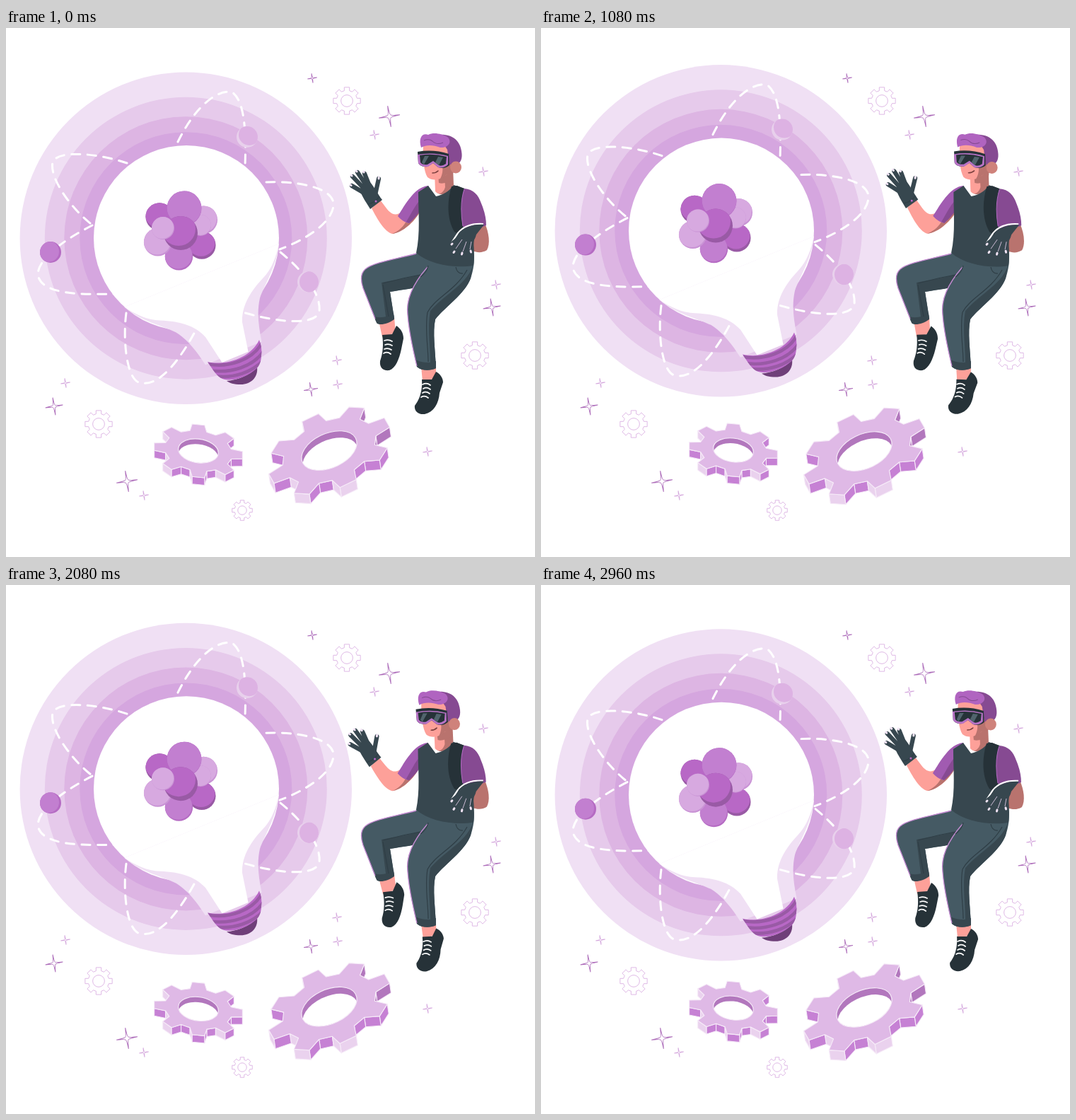
Animation, 748 px wide and 748 px high, one loop 3000 ms. Source, as an HTML page:

```html
<!DOCTYPE html>
<html lang="en">
<head>
<meta charset="utf-8">
<title>Floating idea</title>
<style>
html, body { margin: 0; width: 100%; height: 100%; overflow: hidden; background: #fff; }
svg { display: block; width: 100vw; height: 100vh; }
.orbit path { fill: none; stroke: #fff; stroke-width: 3; stroke-dasharray: 12 10.5; stroke-linecap: round; }
.lace { fill: none; stroke: #fff; stroke-width: 1.7; stroke-linecap: round; }
.finger { fill: none; stroke: #37474f; stroke-width: 6.2; stroke-linecap: round; }
.nail { fill: none; stroke: #f2e4f5; stroke-width: 3; stroke-linecap: round; }
.rim { fill: none; stroke: #c58bd2; stroke-width: 1.3; }
.seam { fill: none; stroke: #2f3e46; stroke-width: 1.2; }
.edge { stroke: #f6ebf8; stroke-width: 1.1; stroke-linejoin: round; vector-effect: non-scaling-stroke; }
.skin { fill: #fda099; }
.tan { fill: #b9736e; }
.dark { fill: #263238; }
.slate { fill: #37474f; }
.pants { fill: #455a64; }
.plum { fill: #864a92; }
</style>
</head>
<body>
<svg viewBox="0 0 748 748" xmlns="http://www.w3.org/2000/svg">
<defs>
  <path id="base" d="M285 472C310 478 346 467 358 441C361 448 362 456 361 463C361 474 356 481 350 485C335 496 318 500 306 496C298 492 295 486 291 481Z"/>
  <clipPath id="baseClip"><use href="#base"/></clipPath>
</defs>
<g id="decor"></g>

<g id="bulb">
  <g id="rings"></g>
  <circle cx="255" cy="297" r="131" fill="#fff"/>
  <!-- neck, drawn along the tilted axis of the bulb -->
  <g transform="translate(255 297) rotate(67.7)">
    <path fill="#f0e0f4" d="M57 118C85 104 102 78 118 64C135 52 155 47 176 43V-43C155 -47 135 -52 118 -64C102 -78 85 -104 57 -118Z"/>
    <path fill="#fff" d="M57 118C72 108 86 96 94 78C104 56 118 36 140 28L182 20V-20L140 -28C118 -36 104 -56 94 -78C86 -96 72 -108 57 -118Z"/>
  </g>
  <path fill="#6f3f79" d="M312 499C325 498 345 492 355 479C357 494 346 504 332 504C322 504 316 502 312 499Z"/>
  <use href="#base" fill="#b868c6"/>
  <g fill="none" stroke="#995aa5" stroke-width="4.6" clip-path="url(#baseClip)">
    <path d="M284 475C314 481 350 470 363 443"/>
    <path d="M286 484C318 489 350 479 365 456"/>
    <path d="M294 492C322 496 348 487 366 468"/>
  </g>
  <g class="orbit">
    <path d="M243 161C270 106 302 86 320 91C337 103 340 145 338 195"/>
    <path d="M171 191C130 177 72 172 66 190C61 212 92 256 124 280"/>
    <path d="M122 279C85 298 45 325 45 349C50 378 110 377 153 376"/>
    <path d="M368 218C410 216 461 225 463 248C464 275 422 300 387 313"/>
    <path d="M388 317C420 343 446 376 443 401C438 420 390 418 335 402"/>
    <path d="M170 403C165 440 170 500 191 502C220 507 250 462 269 426"/>
  </g>
  <g id="balls"></g>
</g>

<g id="gearA"></g>
<g id="gearB"></g>

<g id="person">
  <g id="footA">
    <path class="skin" d="M527 414L549 409L551 431L532 437Z"/>
    <path class="dark" d="M532 434L546 433L552 421C558 425 562 431 562 439L559 454C556 468 551 481 542 484C533 485 528 480 529 471C533 460 534 448 532 434Z"/>
    <path class="lace" d="M535 442Q541 440 546 443M536 448Q541 446 546 449M535 454Q540 452 545 455M534 460Q539 457 544 461"/>
  </g>
  <g id="footB">
    <path class="skin" d="M587 478L608 478L608 495L589 500Z"/>
    <path class="dark" d="M588 497L602 497L608 486C614 489 618 495 618 501L613 516C612 531 605 543 592 546C582 547 577 541 578 534C585 525 589 513 588 497Z"/>
    <path class="lace" d="M589 504Q595 501 600 505M590 510Q595 507 600 511M589 516Q594 513 599 517M587 522Q592 519 597 523"/>
  </g>
  <path class="pants" d="M582 318C555 326 520 331 508 341C500 348 502 359 505 368L522 412C524 421 537 419 549 411L543 373C562 370 582 368 594 362L618 326Z"/>
  <path class="slate" d="M531 360C550 356 575 353 594 346L594 362C580 368 560 370 543 373L549 411L538 416Z"/>
  <path class="slate" d="M521 408C530 411 541 408 548 403L549 412C540 419 527 421 524 417Z"/>
  <path class="rim" d="M580 319C555 326 520 331 508 341C500 348 502 359 505 368L522 411"/>
  <path class="seam" d="M533 361Q562 353 591 348M533 363L541 408"/>
  <path class="pants" d="M582 318L597 336C575 362 565 384 568 406C570 432 576 457 581 479C588 485 600 485 608 481C607 455 603 430 607 412C621 394 649 376 657 354C661 342 663 330 661 320Z"/>
  <path class="slate" d="M661 333C655 360 622 375 600 400C595 425 601 455 600 482L608 481C607 455 603 430 607 412C621 394 649 376 657 354Z"/>
  <path class="slate" d="M579 469C588 474 600 474 608 471L608 481C600 485 588 485 581 479Z"/>
  <path class="rim" d="M596 338C575 362 565 384 568 406C570 432 576 457 581 478"/>
  <path class="seam" d="M652 342C636 371 606 382 596 402C592 426 597 450 597 472M597 336Q595 346 586 352M636 338Q638 348 646 347"/>

  <g id="torso">
    <g id="armA">
      <path class="skin" d="M560 260C551 266 545 264 538 255L529 243L517 255C525 270 535 288 546 291C558 290 574 278 584 262L575 250Z"/>
      <path class="tan" d="M546 291C558 290 574 278 584 262L582 254L567 271C563 280 556 287 546 291Z"/>
      <path class="finger" d="M506 233L489 223M507 228L490 210M511 225L497 204M515 226L507 206M522 236L527 213"/>
      <path class="slate" d="M515 256C508 245 503 237 500 229L511 215C519 220 524 233 532 243Z"/>
      <path class="seam" d="M512 249Q522 247 528 238"/>
      <path class="nail" d="M488 222.500L487 222M489 209L488 208M496 203L495 202M506 204L505.500 203M527 213L527.200 211"/>
      <circle cx="523" cy="245" r="1.500" fill="#b868c6"/>
    </g>
    <path fill="#a15bb1" d="M598 223C581 224 570 240 554 266C558 271 564 275 570 276L586 257V232Z"/>
    <path class="plum" d="M584 245C578 252 572 264 566 274L570 276C577 270 584 262 586 257Z"/>
    <path class="tan" d="M609 205L609 232C616 240 628 232 633 222L632 198Z"/>
    <path class="skin" d="M606 205L607 231C613 238 619 232 621 225L620 206Z"/>
    <path class="tan" d="M677 276C683 290 685 305 680 314C674 318 666 318 660 315L659 284Z"/>
    <path class="slate" d="M597 223L583 232C583 262 586 290 580 318C600 335 635 340 661 336C665 310 656 262 648 227L633 222C626 232 617 236 608 238Z"/>
    <path class="dark" d="M630 224C623 246 624 272 634 288L652 300L648 227L638 223Z"/>
    <path class="plum" d="M648 227C661 228 668 236 672 248C677 260 679 270 679 279C666 285 654 285 646 281C643 262 643 243 648 227Z"/>
    <path fill="none" stroke="#b36bc2" d="M648 228C643 243 643 262 646 280"/>
    <path d="M675 277C660 276 647 280 639 290L629 305" fill="none" stroke="#fff" stroke-width="2.200"/>
    <path class="finger" d="M645 294L631 305M648 298L635 315M653 300L645 318M659 298L657 315"/>
    <path class="slate" d="M676 278C660 277 648 282 640 290L646 306C655 307 662 304 665 292Z"/>
    <path class="nail" d="M631 305L630 306M634 316L633 317.500M645 318L644.500 320M657 315L657.500 317"/>
    <path fill="none" stroke="#dcc8e2" stroke-width=".9" d="M645 299L636 312M651 302L646 316M658 302L656 313"/>
  </g>

  <g id="head">
    <path class="tan" d="M611 207L632 205L631 215C624 218 618 221 612 219Z"/>
    <path class="skin" d="M590 164C589 185 591 203 596 211C603 217 615 215 622 208L637 200L639 172L615 158Z"/>
    <path class="tan" d="M622 208C620 212 617 214 613 215C617 208 618 202 617 196L628 192L634 204Z"/>
    <path class="plum" d="M610 151C632 149 642 160 644 174C646 185 643 191 636 194L627 193L624 172Z"/>
    <ellipse cx="636" cy="197" rx="8" ry="8.500" fill="#cf827b"/>
    <path fill="#b064c0" d="M587 169C583 156 588 148 597 151C605 147 617 150 624 154C632 161 625 170 614 169C604 165 594 165 587 169Z"/>
    <path fill="none" stroke="#864a92" d="M591 159Q598 156 603 160Q609 166 618 162"/>
    <path class="dark" d="M582 175Q604 171 626 178L627 194Q620 200 611 197L604 191L596 196Q586 197 583 191Z"/>
    <path fill="#b873c6" d="M582 179Q604 175 625 181L625 193Q619 199 611 197L604 191L597 196Q586 197 583 191Z"/>
    <path class="dark" d="M585 180Q604 177 623 182L622 192Q616 196 612 194L604 188L596 193Q589 194 586 190Z"/>
    <path fill="#51646d" d="M592 181L598 181L591 193L588 190ZM611 182L618 183L612 194L607 190Z"/>
    <path fill="none" stroke="#7a403f" stroke-width="1.600" stroke-linecap="round" d="M603 205Q608 205 611 202"/>
  </g>
</g>
</svg>

<script>
const LOOP = 3000;
const TAU = 2 * Math.PI;
const $ = id => document.getElementById(id);
const add = (id, markup) => $(id).insertAdjacentHTML('beforeend', markup);

// Eight-toothed outline around (x, y), clockwise; u and v are the axes of the gear's plane
function gearOutline(x, y, u, v, tip = .14) {
  const tooth = [[-.25, .76], [-tip, 1], [tip, 1], [.25, .76]];
  return Array.from({ length: 32 }, (_, i) => {
    const [turn, k] = tooth[i % 4];
    const a = Math.floor(i / 4) * TAU / 8 + turn;
    const c = k * Math.cos(a), s = k * Math.sin(a);
    return [x + c * u[0] + s * v[0], y + c * u[1] + s * v[1]];
  });
}

function flatGear(x, y, r) {
  add('decor', `<g fill="none" stroke="#dfb9e6" stroke-linejoin="round">
    <path d="M${gearOutline(x, y, [r, 0], [0, r], .19).join('L')}Z"/><circle cx="${x}" cy="${y}" r="${r * .43}"/></g>`);
}

// Tips and the other sides turn dark at different angles to the light
function solidGear(id, x, y, u, v, dx, dy, tipLimit) {
  const p = gearOutline(x, y, u, v);
  const sides = p.map((a, i) => {
    const b = p[(i + 1) % p.length];
    const len = Math.hypot(b[0] - a[0], b[1] - a[1]);
    return { a, b, nx: (b[1] - a[1]) / len, ny: (a[0] - b[0]) / len, limit: i % 4 === 1 ? tipLimit : -.4 };
  }).filter(s => s.nx * dx + s.ny * dy > 0)
    .sort((s, t) => s.a[1] + s.b[1] - t.a[1] - t.b[1]);
  const tone = s => s.nx < s.limit ? '#ead2ee' : s.a[1] < y - 20 ? '#b277bd' : '#c681d4';
  add(id, sides.map(s =>
    `<path class="edge" d="M${s.a}L${s.b}l${dx} ${dy}L${s.a[0] + dx} ${s.a[1] + dy}Z" fill="${tone(s)}"/>`).join(''));
  const oval = `r=".45" transform="matrix(${u} ${v} ${x} ${y})"`;
  add(id, `<path class="edge" d="M${p.join('L')}Z" fill="#dfb9e6"/>
    <clipPath id="${id}Hole"><circle ${oval}/></clipPath>
    <circle ${oval} fill="#b277bd"/>
    <g clip-path="url(#${id}Hole)"><g transform="translate(${dx * .7} ${dy * .7})"><circle ${oval} fill="#fff"/></g></g>
    <circle class="edge" ${oval} fill="none"/>`);
}

function sparkle(x, y, r, colour) {
  const k = r * .14;
  const arm = `<path d="M${-k} ${-k}Q${-k / 3} ${-k} 0 ${-r}Q${k / 3} ${-k} ${k} ${-k}"`;
  const arms = [0, 90, 180, 270].map(a => `${arm} transform="rotate(${a})"/>`).join('');
  add('decor', `<g transform="translate(${x} ${y}) rotate(-9)" fill="none" stroke="${colour}">${arms}</g>`);
}

const tones = { light: ['#d7a9e0', '#c993d5'], mid: ['#c27fd0', '#b56bc3'], dark: ['#b868c6', '#995aa5'], pale: ['#ddb2e3', '#e8d0ec'] };
let ballCount = 0;
// The lit part is the ball itself shifted by (dx, dy)
function ball(x, y, r, tone, dx, dy) {
  const [lit, edge] = tones[tone], id = 'ball' + ballCount++;
  add('balls', `<clipPath id="${id}"><circle cx="${x}" cy="${y}" r="${r}"/></clipPath>
    <circle cx="${x}" cy="${y}" r="${r}" fill="${edge}"/>
    <circle cx="${x + dx}" cy="${y + dy}" r="${r}" fill="${lit}" clip-path="url(#${id})"/>`);
}

[[234.7, '#f0e0f4'], [199.5, '#e6caeb'], [172, '#ddb5e3'], [150, '#d5a6df']].forEach(([r, c]) =>
  add('rings', `<circle cx="254.3" cy="297.2" r="${r}" fill="${c}"/>`));

// Nucleus: a ring of small balls, then the front ones
for (let i = 1; i < 6; i++) {
  const a = (i * 60 - 86) * TAU / 360;
  const tone = ['mid', 'light', 'dark'][i % 3];
  ball(247 + 36 * Math.cos(a), 287 + 36 * Math.sin(a), 19.7, tone, -1, tone === 'dark' ? -4 : -2);
}
ball(275, 279, 15, 'light', 0, -1);
ball(252, 255, 24.5, 'mid', 0, -1);
ball(247, 290, 24, 'dark', -3, -6);
ball(222, 283, 16, 'light', -1, -1);
// Electrons
ball(63, 317, 15, 'mid', -3, -1);
ball(341, 154, 15, 'pale', 3, -3);
ball(427, 359, 15, 'pale', 3, 0);

[[482, 103], [131, 560], [663, 463]].forEach(([x, y]) => flatGear(x, y, 19.5));
flatGear(334, 682, 14.5);
[[542, 125], [687, 395], [431, 511], [68, 535], [171, 641]].forEach(([x, y], i) =>
  sparkle(x, y, 10 + 5 * Math.abs(2 - i) / 2, '#ad6dba'));
[[433, 71], [521, 151], [675, 203], [693, 363], [468, 470], [469, 504], [596, 599], [84, 502], [195, 661]].forEach(([x, y], i) =>
  sparkle(x, y, 6.7, i ? '#d3a5dc' : '#ad6dba'));

solidGear('gearA', 272, 598, [63, 6], [0, 37.5], 0, 10.5, -.2);
solidGear('gearB', 457, 597.5, [82.5, -40], [27, 47], 2, 13.5, .6);

const move = (id, y) => $(id).setAttribute('transform', `translate(0 ${y})`);
const turn = (id, deg, x, y) => $(id).setAttribute('transform', `rotate(${deg} ${x} ${y})`);

function draw(now) {
  const p = now % LOOP / LOOP;
  const lift = 1 - Math.abs(1 - 2 * p);
  const sway = Math.sin(p * TAU);
  move('bulb', -14.4 * lift);
  move('gearA', -1.5 * sway);
  move('gearB', 1.4 * sway);
  turn('torso', .3 * sway, 600, 335);
  turn('armA', 1.7 * sway, 548, 284);
  turn('head', 1.4 * sway, 615, 285);
  turn('footA', 2.7 * sway, 538, 412);
  turn('footB', 2.7 * sway, 597, 480);
}
function tick() {
  draw(performance.now());
  requestAnimationFrame(tick);
}
tick();
</script>
</body>
</html>
```
